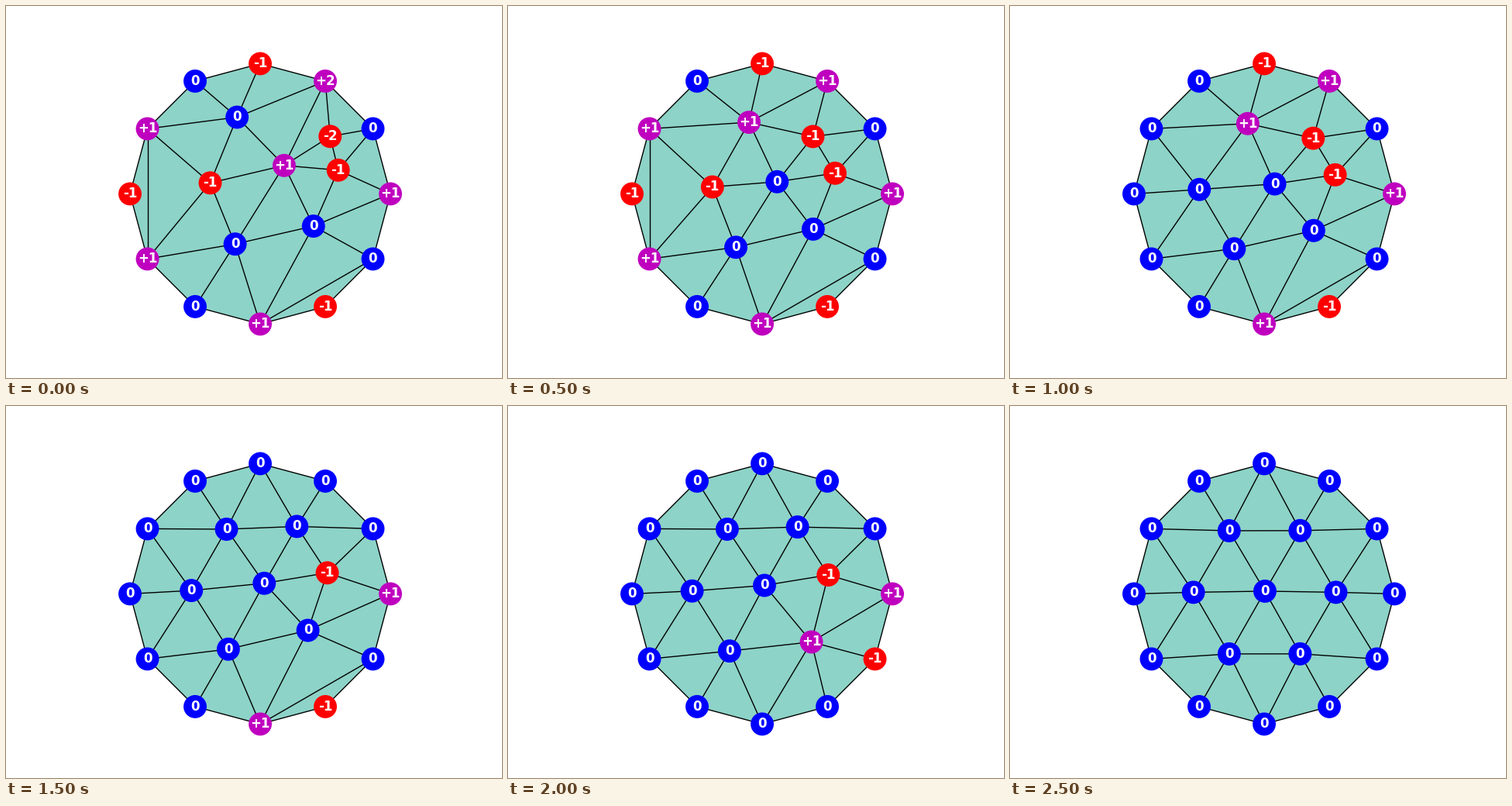
Write a matplotlib script that moves like this. It is 640 px wide and 480 px high and loops after 3000 ms.

```python
import numpy as np
import matplotlib.pyplot as plt
from matplotlib.animation import FuncAnimation
from matplotlib.collections import LineCollection

W, H, DPI = 640, 480, 100
CENTER = np.array([328, 242.4])
RADIUS = 168
SMOOTHING = 3

# Vertices: 0-11 on the rim, 12-17 on the inner ring, 18 is the hub.
HUB = 18
INNER = range(12, 19)
START = [(428, 212), (418, 169), (298, 144), (263, 229),
         (295, 308), (396, 284), (359, 206)]

# Each flip swaps the first edge for the second.
FLIPS = [((2, 18), (13, 14)),
         ((5, 7), (6, 15)),
         ((2, 14), (3, 13)),
         ((9, 11), (10, 17)),
         ((0, 17), (11, 12))]


def regular_edges():
    pairs = [(i, (i + 1) % 12) for i in range(12)]
    for i in range(6):
        ring = 12 + i
        pairs += [(ring, 12 + (i + 1) % 6), (ring, HUB)]
        pairs += [(ring, (2 * i + d) % 12) for d in (-1, 0, 1)]
    return {tuple(sorted(p)) for p in pairs}


def adjacency(edges):
    adj = np.zeros((19, 19))
    for a, b in edges:
        adj[a, b] = adj[b, a] = 1
    return adj


def smooth(points, edges):
    """Move the inner vertices to the mean of their neighbours."""
    adj = adjacency(edges)
    points = points.copy()
    for _ in range(SMOOTHING):
        mean = adj @ points / adj.sum(axis=1, keepdims=True)
        points[INNER] = mean[INNER]
    return points


def build_states():
    edges = regular_edges()
    ideal = adjacency(edges).sum(axis=1)
    for old, new in FLIPS:
        edges = edges - {new} | {old}

    states = []
    points = smooth(np.vstack([rim, START]), edges)
    for flip in FLIPS + [None]:
        excess = (adjacency(edges).sum(axis=1) - ideal).astype(int)
        states.append((points, sorted(edges), excess))
        if flip:
            old, new = flip
            edges = edges - {old} | {new}
            points = smooth(points, edges)
    return states


angles = np.arange(12) * np.pi / 6
rim = CENTER + RADIUS * np.column_stack([np.cos(angles), -np.sin(angles)])
states = build_states()

fig = plt.figure(figsize=(W / DPI, H / DPI), dpi=DPI, facecolor="white")
ax = fig.add_axes([0, 0, 1, 1])
ax.set(xlim=(0, W), ylim=(H, 0))
ax.axis("off")

ax.fill(*rim.T, facecolor="#8dd3c7", edgecolor="none", zorder=0)
lines = ax.add_collection(
    LineCollection([], colors="k", linewidths=1, zorder=1), autolim=False)
nodes = ax.scatter(*states[0][0].T, s=400, linewidths=1.5, zorder=2)
labels = [ax.text(0, 0, "", color="w", size=12, weight="bold",
                  family="DejaVu Sans", ha="center", va="center", zorder=3)
          for _ in range(19)]


def node_color(excess):
    return "m" if excess > 0 else "r" if excess < 0 else "b"


def update(frame):
    points, edges, excess = states[frame]
    lines.set_segments([points[list(e)] for e in edges])
    nodes.set_offsets(points)
    nodes.set_color([node_color(e) for e in excess])
    for label, point, e in zip(labels, points, excess):
        label.set_position(point)
        label.set_text(f"{e:+d}" if e else "0")
    return [lines, nodes, *labels]


anim = FuncAnimation(fig, update, frames=len(states), interval=500,
                     init_func=lambda: update(0), repeat=True, repeat_delay=0)
plt.show()
```
